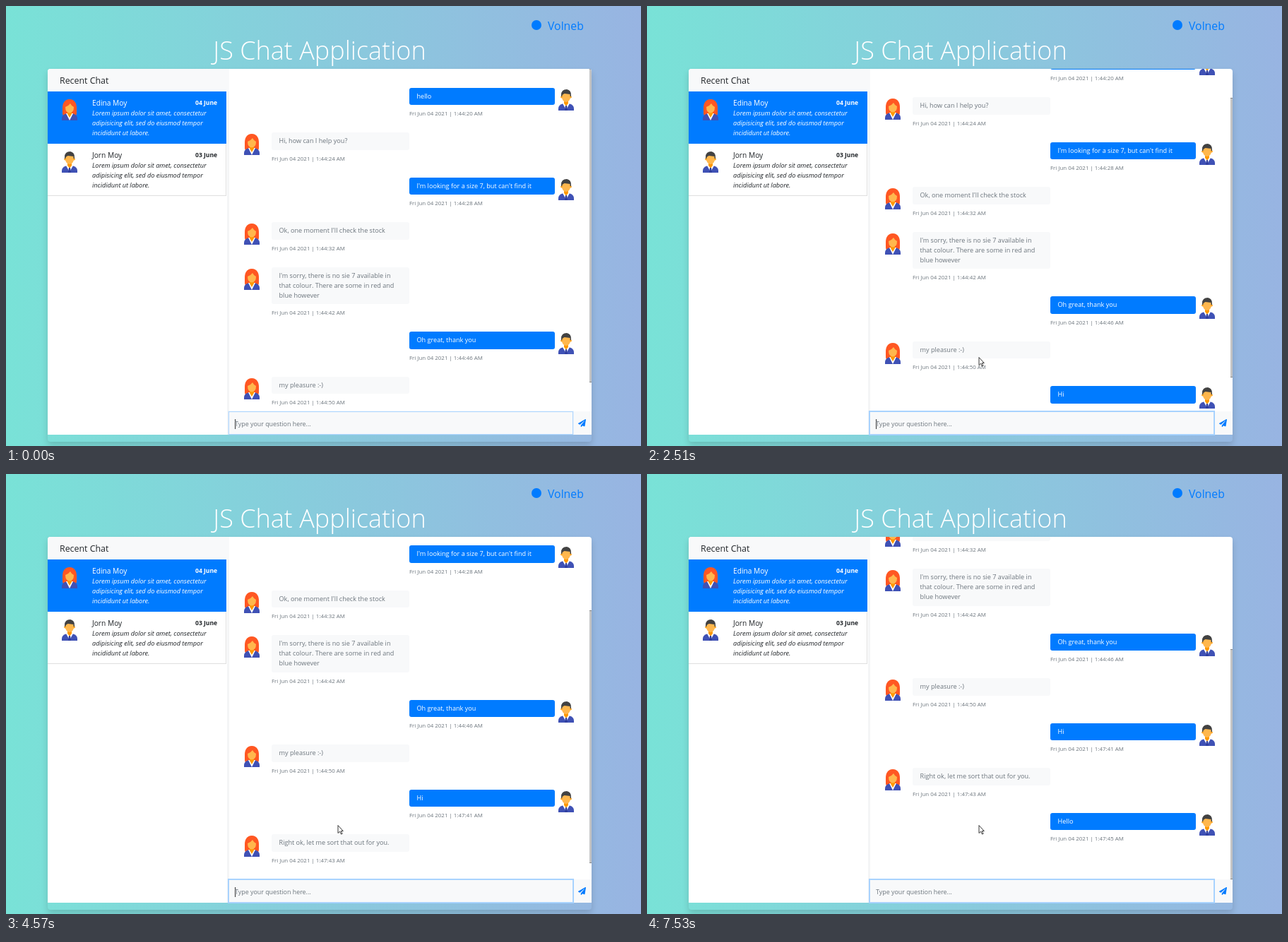
Write an HTML page that moves like this. It is 899x623 px and loops after 8000 ms.

```html
<!DOCTYPE html>
<html lang="en">
<head>
<meta charset="utf-8">
<title>JS Chat Application</title>
<style>
html, body { margin: 0; width: 100%; height: 100%; overflow: hidden; }
body {
  position: relative; color: #212529;
  background: linear-gradient(90deg, #79e2d7, #98b4e2);
  font: 9.12px/14px "Open Sans", "Noto Sans", sans-serif;
}
div, svg { position: absolute; white-space: nowrap; }
#title { left: 0; width: 888px; top: 38px; text-align: center; color: #fff; font-size: 36px; font-weight: 300; line-height: 50px; }
#link { left: 767px; top: 18px; color: #007bff; font-size: 15.8px; line-height: 20px; }
#dot { left: 744px; top: 20px; width: 14px; height: 14px; border-radius: 50%; background: #007bff; }
#card { left: 59px; top: 89px; width: 770px; height: 528px; border-radius: 4px; overflow: hidden; }
#shadow { left: 59px; top: 89px; width: 770px; height: 528px; border-radius: 4px; box-shadow: 0 5px 10px rgba(0,0,0,.15); }
#sheet { width: 770px; height: 518px; background: #fff; }
#gap { left: 254px; width: 3px; height: 518px; background: #f4f5f6; }
#head { width: 257px; height: 32px; background: #f8f9fa; font-size: 12.4px; font-weight: 500; line-height: 33px; text-indent: 17px; }
.contact { left: 0; width: 253px; height: 74px; box-sizing: border-box; }
.contact.on { background: #007bff; color: #fff; }
.contact.off { border: solid #dfdfdf; border-width: 0 1px 1px 0; }
.contact svg { left: 15px; top: 9px; }
.contact .name { left: 63px; top: 8.5px; font-size: 10.2px; font-weight: 500; }
.contact .on-date { right: 13px; top: 8.5px; font-size: 8.5px; font-weight: 700; }
.contact.off .on-date { right: 12px; }
.contact .about { left: 63px; top: 24px; font-size: 9.15px; font-style: italic; }
#view { left: 257px; width: 513px; height: 485px; overflow: hidden; }
.bubble { padding: 5.25px 10.5px; box-sizing: border-box; border-radius: 3px; }
.in .bubble { left: 60px; width: 194.5px; background: #f8f9fa; color: #6c757d; }
.out .bubble { left: 255px; width: 206px; background: #007bff; color: #fff; }
.in .date { left: 60px; }
.out .date { left: 255px; }
.in svg { left: 16px; }
.out svg { left: 461px; }
.date { color: #6c757d; font-size: 7.92px; }
#thumb { right: 0; width: 3px; box-sizing: border-box; background: #c4c4c4; border: solid #888; border-width: 1px 0; }
#send { left: 803px; top: 574px; width: 26px; height: 33px; background: #f8f9fa; }
#field { left: 315px; top: 574px; width: 488px; height: 33px; background: #f8f9fa; font-size: 8.9px; }
#line { left: 9px; top: 10.5px; color: #495057; }
#line.empty { color: #6c757d; }
#caret { display: inline-block; width: 1px; height: 14px; margin-right: -1px; background: #333; vertical-align: top; }
#pointer { left: 0; top: 0; overflow: visible; }
</style>
</head>
<body>
<svg width="0" height="0">
  <symbol id="woman" viewBox="0 0 32 32">
    <path d="M16 2C9 2 6 8 6 14v8q0 4 4 4h12q4 0 4-4v-8C26 8 23 2 16 2z" fill="#ff5722"/>
    <path d="M5 32v-3q0-5 7-7h8q7 2 7 7v3z" fill="#3f51b5"/>
    <path d="M11 22l5 10 5-10z" fill="#fff"/>
    <path d="M13 18h6v5l-3 5-3-5z" fill="#ff9800"/>
    <path d="M10 13q4-1 7-5 2 4 5 5 0 8-6 8.500-6-.5-6-8.500z" fill="#ffb74d"/>
  </symbol>
  <symbol id="man" viewBox="0 0 32 32">
    <path d="M5 32v-3q0-5 7-7h8q7 2 7 7v3z" fill="#3f51b5"/>
    <path d="M11 22l5 9 5-9z" fill="#fff"/>
    <path d="M15 25h2l1 7h-4z" fill="#303f9f"/>
    <path d="M13 17h6v5l-3 3.500-3-3.500z" fill="#ff9800"/>
    <ellipse cx="16" cy="12.500" rx="6.200" ry="7.500" fill="#ffb74d"/>
    <circle cx="9.500" cy="13" r="1.400" fill="#ffa726"/>
    <circle cx="22.500" cy="13" r="1.400" fill="#ffa726"/>
    <path d="M9 12.500V10q0-8 8-8 6 1 6 8v2.500l-1.500-1V9l-8-1-3 2v1.500z" fill="#424242"/>
  </symbol>
</svg>

<div id="title">JS Chat Application</div>
<div id="dot"></div>
<div id="link">Volneb</div>
<div id="shadow"></div>
<div id="card">
  <div id="sheet"></div>
  <div id="gap"></div>
  <div id="head">Recent Chat</div>
  <div id="view"><div id="list"></div><div id="thumb"></div></div>
</div>
<div id="send">
  <svg style="left:7px;top:11px" width="11" height="11" viewBox="0 0 512 512" fill="#007bff"><path d="M476 3L12 271c-18 10-15 35 3 43l106 44 287-253c6-5 14 3 9 9L176 407v80c0 24 28 33 42 16l64-77 125 52c14 6 30-3 33-18l72-432C515 8 493-7 476 3z"/></svg>
</div>
<div id="field"><div id="line"><span id="typed"></span><span id="caret"></span><span id="hint">Type your question here...</span></div></div>
<svg id="pointer" width="12" height="16">
  <path id="arrow" d="M.5.5v11l2.600-2.400 1.900 3.900 1.600-.7-1.800-3.800h3z" fill="#fff" stroke="#222" stroke-width=".9"/>
  <path id="beam" d="M-1.500-5.500h1.500l1 1 1-1h1.500M1-4.500v10M-1.500 6.500h1.500l1-1 1 1h1.500" fill="none" stroke="#555"/>
</svg>

<script>
const $ = id => document.getElementById(id);
const LOOP = 8000, VIEW = 485, ROW = 63.5;
const face = who => `<svg width="32" height="32"><use href="#${who}"/></svg>`;

const about = 'Lorem ipsum dolor sit amet, consectetur<br>adipisicing elit, sed do eiusmod tempor<br>incididunt ut labore.';
[['on', 'woman', 'Edina Moy', '04 June'], ['off', 'man', 'Jorn Moy', '03 June']].forEach(([state, who, name, date], i) => {
  $('card').insertAdjacentHTML('beforeend',
    `<div class="contact ${state}" style="top:${32 + 74 * i}px">${face(who)}<div class="name">${name}</div>
     <div class="on-date">${date}</div><div class="about">${about}</div></div>`);
});

// side, text, time sent, moment of arrival in the loop
const messages = [
  ['out', 'hello', '1:44:20'],
  ['in', 'Hi, how can I help you?', '1:44:24'],
  ['out', "I'm looking for a size 7, but can't find it", '1:44:28'],
  ['in', "Ok, one moment I'll check the stock", '1:44:32'],
  ['in', "I'm sorry, there is no sie 7 available in<br>that colour. There are some in red and<br>blue however", '1:44:42'],
  ['out', 'Oh great, thank you', '1:44:46'],
  ['in', 'my pleasure :-)', '1:44:50'],
  ['out', 'Hi', '1:47:41', 2510],
  ['in', 'Right ok, let me sort that out for you.', '1:47:43', 4480],
  ['out', 'Hello', '1:47:45', 7210]
];
let top_ = 27;
const late = [];
for (const [side, text, time, arrival] of messages) {
  const extra = 14 * (text.split('<br>').length - 1);
  const row = document.createElement('div');
  row.className = side;
  row.style.top = top_ - .3 + 'px';
  row.innerHTML = `${face(side === 'in' ? 'woman' : 'man')}<div class="bubble">${text}</div>
    <div class="date" style="top:${29.5 + extra}px">Fri Jun 04 2021 | ${time} AM</div>`;
  $('list').append(row);
  if (arrival) late.push({ row, arrival });
  top_ += ROW + extra;
}

// Each key is [time, value]; a value holds until the next key.
const scroll = [[0, 0], [80, 25], [160, 45], [2510, 50], [2600, 80], [2680, 108.5],
  [4480, 113], [4570, 141.5], [4630, 172], [7210, 177], [7290, 207], [7360, 235.5]];
const typed = [[0, ''], [1640, 'H'], [2110, 'Hi'], [2510, ''], [6200, 'H'], [6500, 'He'],
  [6680, 'Hel'], [6820, 'Hell'], [6990, 'Hello'], [7210, '']];
const blinks = [470, 1010, 1560, 1640, 2680, 3140, 3690, 4260, 4800, 5260, 5820, 6200, 7530];
const travel = [[0, -1], [390, 0], [470, .25], [550, .5], [620, .75], [700, 1]];
const ring = [[0, .2], [80, .6], [160, 1]];
const at = (keys, t) => keys.findLast(key => key[0] <= t)[1];

function draw(t) {
  const y = at(scroll, t);
  let height = 530;
  for (const { row, arrival } of late) {
    const here = t >= arrival;
    row.style.display = here ? '' : 'none';
    if (here) height += ROW;
  }
  $('list').style.top = -y + 'px';
  $('thumb').style.top = y * VIEW / height + 'px';
  $('thumb').style.height = VIEW * VIEW / height + 'px';

  const text = at(typed, t);
  $('typed').textContent = text;
  $('hint').hidden = text !== '';
  $('line').className = text ? '' : 'empty';
  $('caret').style.visibility = blinks.filter(b => b <= t).length % 2 ? 'hidden' : 'visible';
  $('field').style.boxShadow = `inset 0 0 0 1px #b0d6fd, 0 0 0 1px rgba(160,207,255,${at(ring, t)})`;

  const p = at(travel, t), e = p * (2 - p);
  $('pointer').style.display = p < 0 ? 'none' : '';
  $('pointer').style.transform = `translate(${105 + 364.5 * e}px, ${94 + 403 * e}px)`;
  const overText = t >= 4630 && t < 7360;
  $('arrow').style.display = overText ? 'none' : '';
  $('beam').style.display = overText ? '' : 'none';
}

function tick() {
  draw(performance.now() % LOOP);
  requestAnimationFrame(tick);
}
tick();
</script>
</body>
</html>
```
